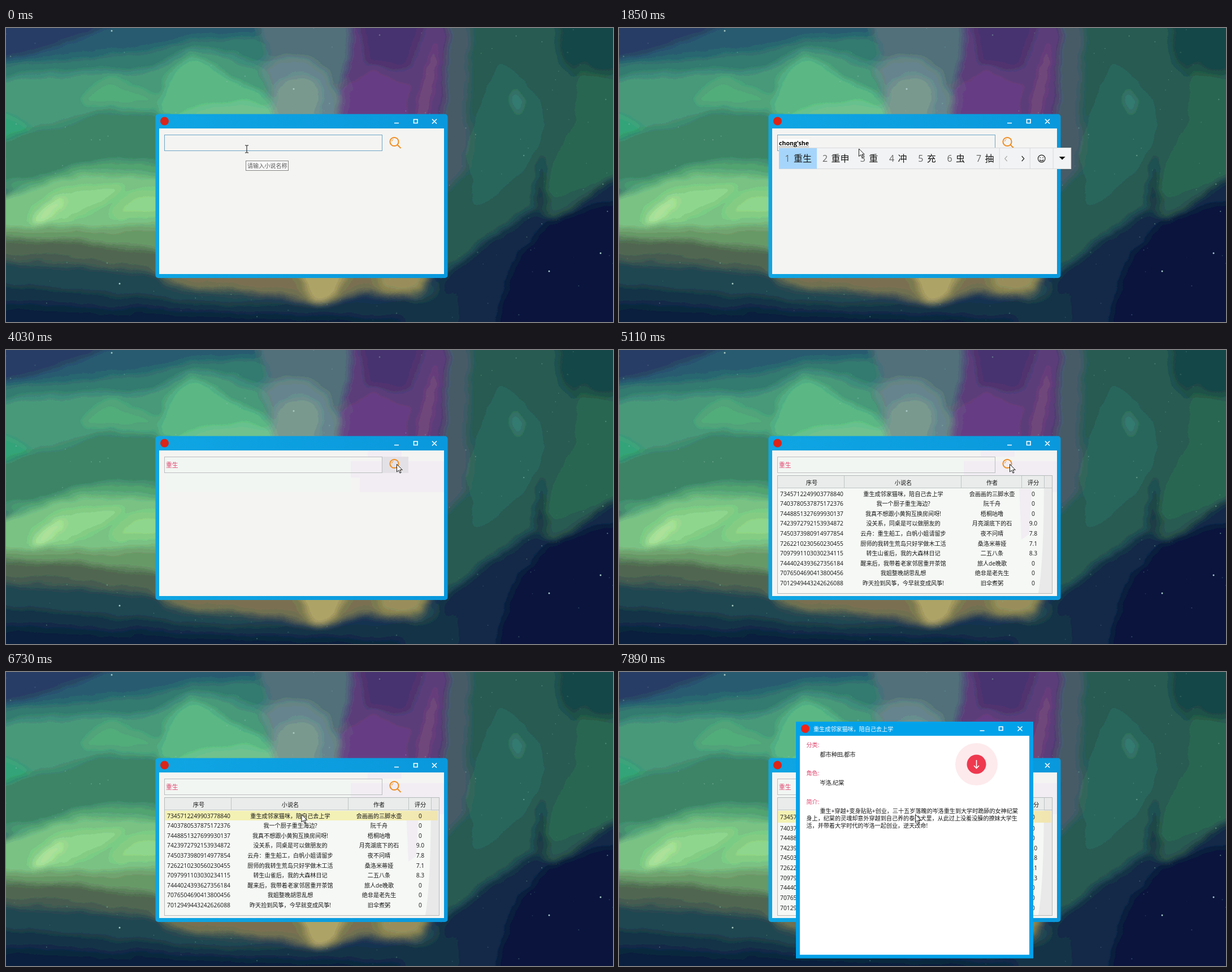
Write an HTML page that moves like this. It is 1074 by 521 pixels and loops after 8000 ms.

```html
<!DOCTYPE html>
<html lang="zh-CN">
<head>
<meta charset="utf-8">
<title>小说搜索</title>
<style>
html, body { margin: 0; width: 100%; height: 100%; overflow: hidden; background: #1a3450; }
svg { display: block; width: 1074px; height: 521px; }
text { font: 10.1px "Open Sans", "Noto Sans CJK SC", "Noto Sans CJK JP", sans-serif; fill: #161616; white-space: pre; }
.id { font-size: 10.3px; }
.mid { text-anchor: middle; }
.pink { fill: #e0436c; }
.typed { font-weight: 700; font-size: 10.6px; fill: #000; }
.cand { font-size: 16px; }
.num { fill: #666; }
.line { fill: none; stroke: #fff; stroke-width: 1.6; }
</style>
</head>
<body>
<svg viewBox="0 0 1074 521">
  <defs>
    <filter id="paint" filterUnits="userSpaceOnUse" x="-40" y="-40" width="1154" height="601" color-interpolation-filters="sRGB">
      <feTurbulence type="fractalNoise" baseFrequency=".014 .022" numOctaves="3" seed="4" result="noise"/>
      <feGaussianBlur in="SourceGraphic" stdDeviation="7" result="soft"/>
      <feDisplacementMap in="soft" in2="noise" scale="18" xChannelSelector="R" yChannelSelector="G"/>
      <feComponentTransfer id="bands"/>
    </filter>
    <linearGradient id="bar">
      <stop offset="0" stop-color="#0fa5e3"/><stop offset="1" stop-color="#0998dc"/>
    </linearGradient>
    <linearGradient id="rowTone">
      <stop offset="0" stop-color="#f3f1b2"/><stop offset=".7" stop-color="#f3f1b6"/><stop offset="1" stop-color="#f1e5b0"/>
    </linearGradient>
  </defs>

  <!-- Painted aurora, back to front -->
  <g id="sky" filter="url(#paint)">
    <rect x="-60" y="-60" width="1200" height="650" fill="#1a3450"/>
    <path fill="#2d6070" d="M-60-60H640V100H-60z"/>
    <path fill="#2b3f66" d="M-60-60H270L130 20 60 40-60 75z"/>
    <path fill="#357b74" d="M-60 68C80 55 200 50 300 28S520 20 640 60V160H-60z"/>
    <path fill="#489678" d="M-60 100C60 80 140 70 200 78S280 55 330 40 480 85 600 100V290H-60z"/>
    <path fill="#53a77e" d="M130 125Q160 80 200 90T270 125 140 140z"/>
    <path fill="#5cb888" d="M272 120C290 65 320 45 345 58S420 100 480 135V190H272z"/>
    <path fill="#72c48c" d="M300 160Q400 110 480 150V190H300z"/>
    <path fill="#37a678" d="M-60 140Q30 150 46 190T-60 225z"/>
    <path fill="#3c8268" d="M-60 215C60 180 130 155 200 150S260 160 300 155V240C200 230 150 245 80 262S0 285-60 285z"/>
    <path fill="#55a274" d="M-60 285C80 262 120 240 200 236S260 240 300 240V280H-60z"/>
    <path fill="#547078" d="M430-60H640V170H500C500 110 460 60 430-60z"/>
    <path fill="#66888a" d="M450 65Q520 30 570 75L600 170H480z"/>
    <path fill="#7d9b8f" d="M478 105C510 78 545 82 552 112V180H475z"/>
    <path fill="#48606a" d="M774-60H840L825 300 800 380H770z"/>
    <path fill="#5a3d77" d="M615-60H782L774 180H588L602 90z"/>
    <path fill="#4c3670" d="M618-60H750L712 70 640 60z"/>
    <path fill="#6b4484" d="M592 105L650 75 720 100 700 180H585z"/>
    <path fill="#774a7e" d="M757 10L735 110 718 180H745L762 60z"/>
    <path fill="#2a5c56" d="M826-60H1140V340H980L900 345 770 440V300L815 250z"/>
    <path fill="#1c4a48" d="M968-60H1140V70L1020 90 980 60z"/>
    <path fill="#30685b" d="M870 60C920 90 960 120 950 180S880 290 830 320L815 200z"/>
    <path fill="#2f6850" d="M1015 70L1060 80 1140 130V230L1000 300 960 310 950 270 1000 180z"/>
    <path fill="#3a8580" d="M904 112l10 20-10 22-10-22z"/>
    <path fill="#7cc486" d="M-60 310C40 290 90 264 160 260S260 262 300 268V355H-60z"/>
    <path fill="#92d48c" d="M45 338C80 292 150 276 190 282S150 310 110 338z"/>
    <path fill="#8ed08a" d="M190 332C210 296 250 288 300 290V326z"/>
    <path fill="#aee29a" d="M50 342Q65 305 100 302Q95 325 65 345z"/>
    <path fill="#6b9a6a" d="M-60 345C60 360 180 345 300 350V400C200 388 100 376-60 376z"/>
    <path fill="#506450" d="M-60 380C100 372 200 390 300 400V445C200 432 100 420-60 430z"/>
    <path fill="#244850" d="M-60 412C80 408 200 425 280 440S420 480 560 500 720 470 790 430V580H-60z"/>
    <path fill="#172f4a" d="M770 440L860 370 940 318 1000 300 1140 240V590H740z"/>
    <path fill="#0b1a3c" d="M905 400L960 340 1140 290V590H845z"/>
    <path fill="#1b3c48" d="M934 310L950 215 954 290 985 330 940 325z"/>
    <path fill="#2f5a50" d="M948 310L1074 262 1000 325 965 338z"/>
    <path fill="#77754f" d="M262 425H752L738 468 700 474 640 466 560 488 500 478 420 470 340 462 285 452z"/>
    <path fill="#b0a468" d="M515 430H605L585 468 560 490 535 470z"/>
    <path fill="#98915c" d="M645 430H742L728 466 670 462z"/>
    <path fill="#17344a" d="M-60 455C100 460 250 485 400 490S640 502 800 470V590H-60z"/>
    <path fill="#0f2640" d="M-60 492C150 492 400 508 700 515V590H-60z"/>
  </g>
  <g id="stars"></g>

  <g id="main">
    <rect x="264.5" y="152.5" width="517" height="290.5" rx="5" fill="url(#bar)"/>
    <rect x="271" y="178" width="504" height="258" fill="#f4f4f2"/>
    <circle cx="280.5" cy="165" r="7.5" fill="#dc2418"/>
    <path class="line" d="M687 168.5h8M721.5 162h6.500v6.500h-6.500zM754 161.500l8 8M762 161.500l-8 8"/>
    <g id="tint">
      <path fill="#f2f6f3" d="M282 189H610V252H282z"/>
      <path fill="#f1edf3" d="M610 197H775V252H626V226H610zM640 179H700V189H640z"/>
    </g>
    <rect id="hover" x="666" y="189" width="46" height="29" fill="#e4e1e6"/>
    <rect id="field" x="280.5" y="189.5" width="385" height="28" fill="none"/>
    <text id="query" class="pink" x="283" y="208" style="font-size:10.8px">重生</text>
    <g fill="none" stroke="#f08c1e" stroke-width="2">
      <circle cx="687" cy="201.500" r="7.600"/><path d="M692.500 207l6 6"/><path stroke-width="1" d="M682.500 201q.5-3 3-4"/>
    </g>
    <g id="table">
      <rect x="280.5" y="222.5" width="486" height="209" fill="#f5f8f5" stroke="#b4b9b8"/>
      <path fill="#e9ecea" d="M281 223H766V245H281z"/>
      <path fill="#f1edf3" d="M708 246h22l-4 80-14 10z"/>
      <path fill="#e9e9ea" d="M752 223h14v208h-24q10-60 10-208z"/>
      <path stroke="#bfc4c3" fill="none" d="M281 244.500H766M398.500 223V244M605.500 223V244M712.500 223V244M752.500 223V244"/>
      <rect id="mark" x="281" y="246" width="483" height="17" fill="url(#rowTone)"/>
    </g>
    <g id="tip">
      <rect x="424.500" y="235.500" width="75" height="17" fill="#f8f8f8" stroke="#858585"/>
      <text x="427" y="248" style="fill:#5a5a5a">请输入小说名称</text>
    </g>
    <path id="caret" stroke="#000" d="M.5 197v13"/>
  </g>

  <g id="ime">
    <rect id="typedBg" x="282" y="197" height="14" fill="#fff"/>
    <text id="typed" class="typed" x="283" y="208"></text>
    <path id="dots" stroke="#222" stroke-dasharray="1 1" fill="none"/>
    <rect id="panel" x="283.500" y="212.500" height="37" fill="#f2f3f4" stroke="#d7d9da"/>
    <rect id="first" x="283" y="213" height="36.500" fill="#a6d5fb"/>
    <g id="cands"></g>
    <g id="tools" fill="none" stroke="#222" stroke-width="1.200">
      <path stroke="#d7d9da" stroke-width="1" d="M.5 213V249M54.500 213V249M95.500 213V249"/>
      <path stroke="#aaa" d="M14 227l-4 4.500 4 4.500"/>
      <path d="M40 227l4 4.500-4 4.500"/>
      <circle cx="75" cy="231.500" r="6.300"/><path d="M71.500 233.500q3.500 4 7 0M72.500 229v1.600M77.500 229v1.600"/>
      <path fill="#111" stroke="none" d="M106 228h11l-5.500 5.500z"/>
    </g>
  </g>

  <g id="popup">
    <rect x="313" y="88" width="420" height="419.500" fill="#02a2ea"/>
    <rect x="320" y="113" width="406" height="388" fill="#fff"/>
    <circle cx="329.500" cy="100.500" r="7.500" fill="#ee2418"/>
    <path class="line" d="M638.500 104h8M672.500 97h6.500v6.500h-6.500zM705.500 96.500l8 8M713.500 96.500l-8 8"/>
    <circle cx="632.500" cy="163.500" r="37.500" fill="#fdeaec"/>
    <circle cx="632.500" cy="163.500" r="17" fill="#ee394f"/>
    <path class="line" d="M632.500 156v14M628 166l4.500 4.500 4.500-4.500"/>
  </g>
  <path id="arrow" fill="#fff" stroke="#000" stroke-width=".9" d="M.5.5v13.500l3.200-2.900 2.300 5 2-.9-2.200-4.800h4.400z"/>
  <path id="beam" fill="none" stroke="#111" d="M-3-6.500h2.500l.5.500.5-.5H3M0-6.500v13M-3 6.500h2.500l.5-.5.5.5H3"/>
</svg>

<script>
const $ = id => document.getElementById(id);
const add = (parent, tag, attrs, content = '') => {
  const el = document.createElementNS('http://www.w3.org/2000/svg', tag);
  for (const key in attrs) el.setAttribute(key, attrs[key]);
  el.textContent = content;
  return parent.appendChild(el);
};

// Colour steps of the painting
const levels = Array.from({ length: 26 }, (_, i) => i / 25).join(' ');
for (const ch of 'RGB') add($('bands'), 'feFunc' + ch, { type: 'discrete', tableValues: levels });

let seed = 11;
const rand = () => (seed = seed * 16807 % 2147483647) / 2147483647;
for (let i = 0; i < 150; i++) {
  add($('stars'), 'circle', {
    cx: rand() * 1074, cy: rand() * 521, r: .5 + rand() * .8,
    fill: '#8fc4b4', opacity: .15 + rand() * .35
  });
}
for (const [cx, cy] of [[187, 5], [509, 108], [1052, 399], [201, 453], [961, 431]]) {
  add($('stars'), 'circle', { cx, cy, r: 1.5, fill: '#a9cbc6' });
}

// Result table
const books = [
  ['7345712249903778840', '重生成邻家猫咪，陪自己去上学', '会画画的三脚水壶', '0'],
  ['7403780537875172376', '我一个厨子重生海边?', '阮千舟', '0'],
  ['7448851327699930137', '我真不想跟小黄狗互换房间呀!', '梧桐咕噜', '0'],
  ['7423972792153934872', '没关系，同桌是可以做朋友的', '月亮湖底下的石', '9.0'],
  ['7450373980914977854', '云舟：重生船工，白帆小姐请留步', '夜不问晴', '7.8'],
  ['7262210230560230455', '厨师的我转生荒岛只好学做木工活', '桑洛米蒂娅', '7.1'],
  ['7097991103030234115', '转生山雀后，我的大森林日记', '二五八条', '8.3'],
  ['7444024393627356184', '醒来后，我带着老家邻居重开茶馆', '旅人de晚歌', '0'],
  ['7076504690413800456', '我姐整晚胡思乱想', '绝非是老先生', '0'],
  ['7012949443242626088', '昨天捡到风筝，今早就变成风筝!', '旧伞煮粥', '0']
];
const columns = [341, 503, 660, 733];
const addRow = (cells, y) => {
  const row = add($('table'), 'g', {});
  cells.forEach((cell, i) =>
    add(row, 'text', { x: columns[i], y, class: i % 3 ? 'mid' : 'mid id' }, cell));
  return row;
};
addRow(['序号', '小说名', '作者', '评分'], 238.5);
const rows = books.map((book, i) => addRow(book, 258.5 + i * 17.62));

// Detail window
const note = (x, y, str, cls = '') => add($('popup'), 'text', { x, y, class: cls }, str);
note(344, 104.5, books[0][1]).style.fill = '#fff';
note(331.5, 132.5, '分类:', 'pink');
note(355.5, 149.5, '都市种田,都市');
note(331.5, 183, '角色:', 'pink');
note(355.5, 200, '岑洛,纪棠');
note(331.5, 233.5, '简介:', 'pink');
note(355.5, 250, '重生+穿越+变身贴贴+创业，三十五岁落魄的岑洛重生到大学时跪舔的女神纪棠');
note(331.5, 263.3, '身上，纪棠的灵魂却意外穿越到自己养的泰迪犬里，从此过上没羞没臊的撩妹大学生');
note(331.5, 276, '活，并带着大学时代的岑洛一起创业，逆天改命!');

// Time tables: each entry holds until the next
const cursor = [
  [0, 'beam', 426, 214.5], [1130, 'arrow', 424, 213.5], [2680, 'beam', 448, 202],
  [2820, 'beam', 525, 192], [2940, 'arrow', 598, 170], [3060, 'arrow', 655, 149],
  [3180, 'arrow', 689, 194], [3330, 'arrow', 690, 199], [3450, 'arrow', 691, 202],
  [5790, 'arrow', 650, 225], [5910, 'arrow', 606, 232], [6060, 'arrow', 570, 238],
  [6180, 'arrow', 545, 246], [6300, 'arrow', 531, 249], [6450, 'arrow', 522, 251],
  [6730, 'arrow', 522.5, 252], [7890, 'arrow', 524, 252]
];
const single = '冲 抽 重 丑 充 虫 臭';
const mixed = '重生 重申 重 冲 充 虫 抽';
const typing = [
  [0], [1130, 'c', '才 从 此 次 出 产 程'], [1280, 'cho', single], [1400, 'chon', single],
  [1550, "chong's", '重生 重申 重塑 重商 冲刷 充实 虫蛇'], [1700, "chong'sh", mixed],
  [1850, "chong'she", mixed], [1970, "chong'sheng", mixed], [2090]
];
const carets = [[0, 0], [270, 283], [730, 0], [2240, 305], [2680, 0], [3180, 305], [3600, 0]];
const rowCount = [[0, 0], [4810, 3], [4960, 8], [5110, 10]];

const at = (table, t) => table.findLast(step => step[0] <= t);
const show = (el, on) => { el.style.display = on ? '' : 'none'; };
const move = (el, x, y) => el.setAttribute('transform', `translate(${x} ${y})`);

let shown;
function drawIme([, keys, list]) {
  show($('ime'), keys);
  if (shown === keys) return;
  shown = keys;
  if (!keys) return;
  $('typed').textContent = keys;
  const end = 283 + $('typed').getComputedTextLength();
  $('typedBg').setAttribute('width', end - 281);
  $('dots').setAttribute('d', `M283 210.5H${end}`);
  $('cands').textContent = '';
  let x = 283;
  list.split(' ').forEach((word, i) => {
    add($('cands'), 'text', { x: x + 10.5, y: 237, class: 'cand num' }, i + 1);
    add($('cands'), 'text', { x: x + 26, y: 237, class: 'cand' }, word);
    x += 36 + word.length * 15.3;
    if (!i) $('first').setAttribute('width', x - 282.5);
  });
  $('panel').setAttribute('width', x + 127 - 283.5);
  move($('tools'), x, 0);
}

function draw(t) {
  const [, kind, x, y] = at(cursor, t);
  show($('arrow'), kind === 'arrow');
  show($('beam'), kind === 'beam');
  move($(kind), x, y);

  const caret = at(carets, t)[1];
  show($('caret'), caret);
  move($('caret'), caret, 0);

  drawIme(at(typing, t));
  show($('tip'), t < 1130);
  show($('query'), t >= 2090);
  show($('tint'), t >= 2090);
  show($('hover'), t >= 3750 && t < 5110);
  $('field').setAttribute('stroke', t < 3750 ? '#6ea6c6' : '#bbbdbf');

  const open = t >= 6880;
  const count = at(rowCount, t)[1];
  show($('table'), count);
  rows.forEach((row, i) => {
    show(row, i < count);
    move(row, 0, open ? (i ? 4.5 : 2) : 0);
  });
  show($('mark'), t >= 6180);
  $('mark').setAttribute('height', open ? 21 : 17);
  show($('popup'), open);
}

const start = performance.now();
function frame(now) {
  draw(Math.max(0, now - start) % 8000);
  requestAnimationFrame(frame);
}
draw(0);
requestAnimationFrame(frame);
</script>
</body>
</html>
```
